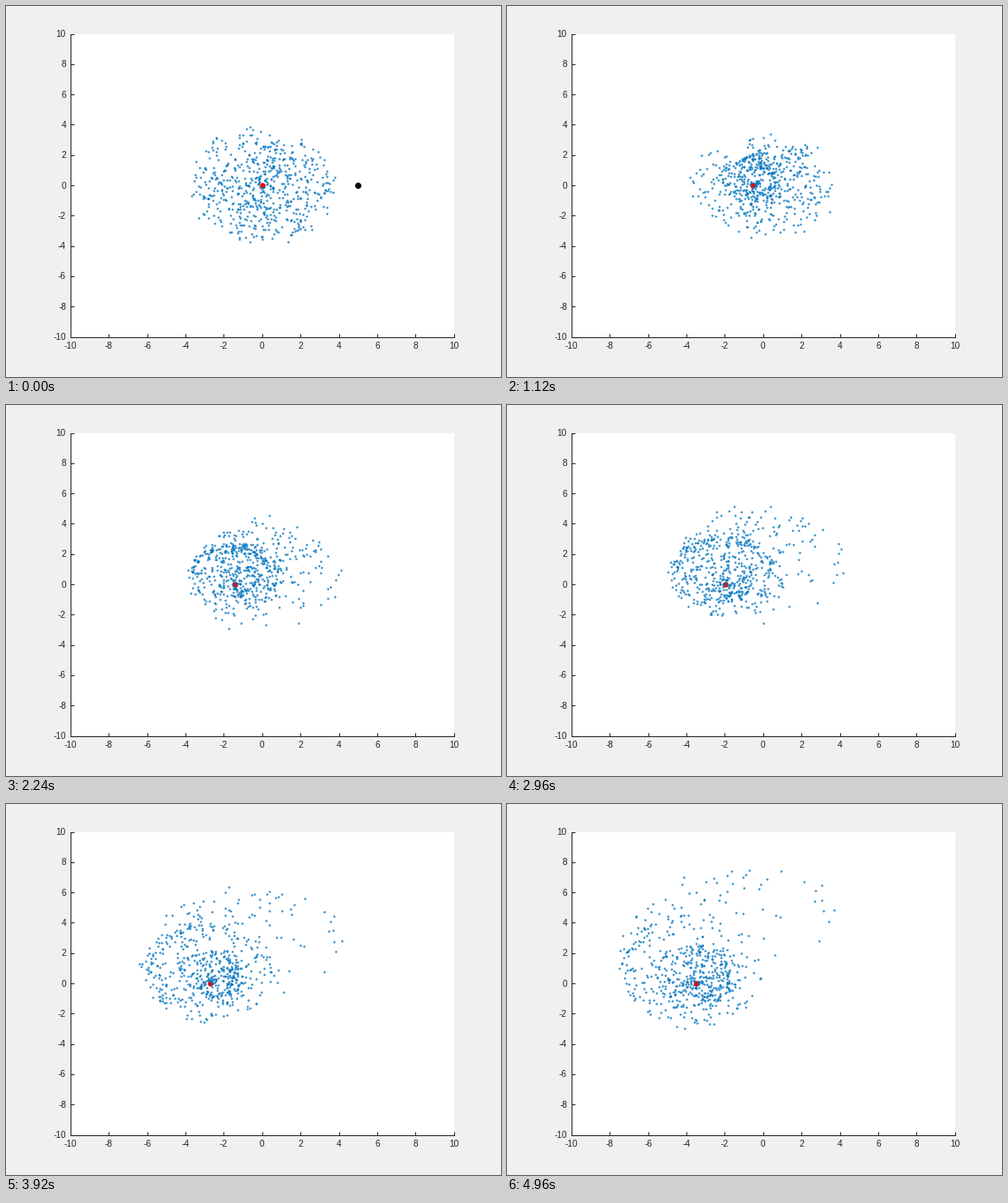
These frames come from a looping animation (560 by 420 pixels, 4.98 s). A matplotlib script:

```python
import numpy as np
import matplotlib.pyplot as plt
from matplotlib.animation import FuncAnimation

W, H, DPI = 560, 420, 100
FRAMES, STEP_MS = 249, 20
PX = 72 / DPI              # one pixel in points
LEFT, RIGHT, TOP, BOTTOM = 72.8, 506.8, 31.6, 374.5
INK = "#262626"
BLUE = "#0072BD"

# Distances are in axis units, time in frames
STARS = 600
CORE_GM, CORE_SOFT = 0.0105, 0.12
VISITOR_GM, VISITOR_SOFT = 0.0025, 0.9
SPIN = (0.7, 1.04)         # range of speeds, 1 is a circular orbit
SUB = 8                    # integration steps per frame


def core_x(t):
    """The red body is tugged right, then drifts left after the flyby."""
    if t < 10:
        return 0.155 * (t / 10) ** 3
    return 0.155 - 0.0153 * (t - 10)


def visitor_x(t):
    return 5 - 0.4935 * t


def pull(pos, x, gm, soft):
    d = pos - (x, 0)
    r2 = (d ** 2).sum(axis=1, keepdims=True) + soft ** 2
    return -gm * d / r2 ** 1.5


def simulate():
    rng = np.random.default_rng(12)
    r = 0.08 + 3.92 * rng.beta(1.65, 1.45, STARS)
    a = rng.uniform(0, 2 * np.pi, STARS)
    speed = np.sqrt(CORE_GM * r ** 2 / (r ** 2 + CORE_SOFT ** 2) ** 1.5)
    speed *= rng.uniform(*SPIN, STARS)
    pos = np.column_stack([r * np.cos(a), r * np.sin(a)])
    vel = np.column_stack([-speed * np.sin(a), speed * np.cos(a)])
    path = [pos.copy()]
    h = 1 / SUB
    for i in range((FRAMES - 1) * SUB):
        t = i * h
        acc = pull(pos, core_x(t), CORE_GM, CORE_SOFT)
        acc += pull(pos, visitor_x(t), VISITOR_GM, VISITOR_SOFT)
        vel += h * acc
        pos += h * vel
        if (i + 1) % SUB == 0:
            path.append(pos.copy())
    return path


def label(x, y, value, align):
    fig.text(x / W, 1 - y / H, str(value), ha=align, va="baseline",
             family="Liberation Sans", size=10 * PX, color=INK)


def dots(color, diameter, z, alpha=1):
    return ax.plot([], [], "o", color=color, ms=diameter * PX, mew=0,
                   alpha=alpha, zorder=z)[0]


fig = plt.figure(figsize=(W / DPI, H / DPI), dpi=DPI, facecolor="#f0f0f0")
ax = fig.add_axes([LEFT / W, 1 - BOTTOM / H, (RIGHT - LEFT) / W,
                   (BOTTOM - TOP) / H], facecolor="white")
ticks = range(-10, 11, 2)
ax.set(xlim=(-10, 10), ylim=(-10, 10), xticks=ticks, yticks=ticks)
ax.tick_params(direction="in", length=4.3 * PX, width=PX, color=INK,
               labelbottom=False, labelleft=False)
for side, spine in ax.spines.items():
    spine.set(visible=side in ("left", "bottom"), color=INK, linewidth=PX)

for v in ticks:
    part = (v + 10) / 20
    label(LEFT + part * (RIGHT - LEFT), 388, v, "center")
    label(68, BOTTOM + part * (TOP - BOTTOM) + 3.5, v, "right")

core = dots("red", 6.4, 2.0)
visitor = dots("black", 7, 2.1)
stars = dots(BLUE, 2.4, 2.2, 0.85)
path = simulate()


def draw(n):
    stars.set_data(path[n][:, 0], path[n][:, 1])
    core.set_data([core_x(n)], [0])
    visitor.set_data([visitor_x(n)], [0])
    return stars, core, visitor


anim = FuncAnimation(fig, draw, frames=FRAMES, interval=STEP_MS,
                     repeat=True, repeat_delay=0)
plt.show()
```
